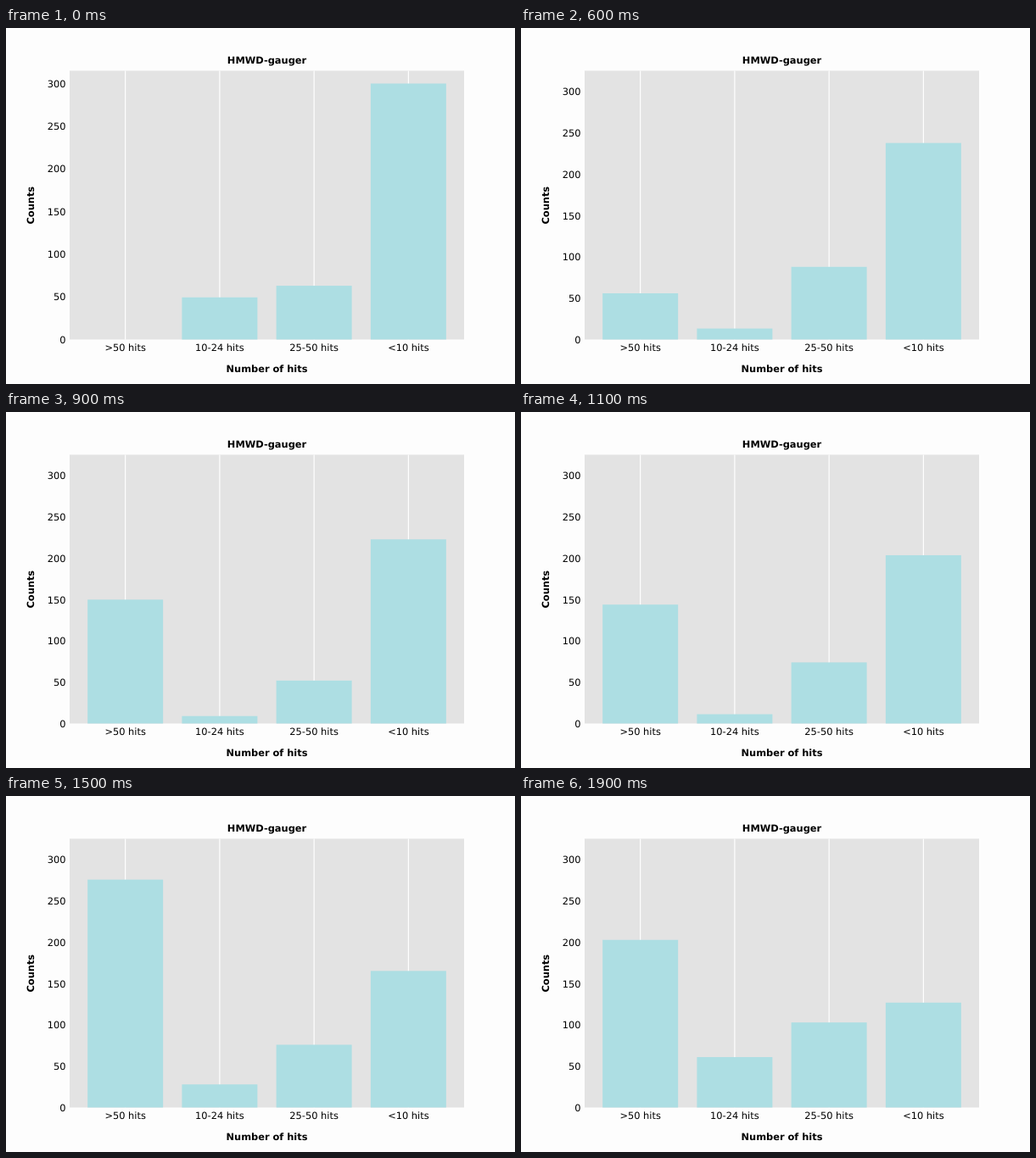
Write an HTML page that moves like this. It is 600 px wide and 420 px high and loops after 2 s.

```html
<!DOCTYPE html>
<html lang="en">
<head>
<meta charset="utf-8">
<title>Hit counts</title>
<style>
  html, body { margin: 0; width: 100%; height: 100%; overflow: hidden; background: #fdfdfd; }
  svg { display: block; width: 100%; height: 100%; }
  text { font: 11.4px "DejaVu Sans", sans-serif; fill: #000; text-anchor: middle; text-rendering: geometricPrecision; }
  .bold { font-weight: bold; }
  .tick { text-anchor: end; }
</style>
</head>
<body>
<svg id="chart" viewBox="0 0 600 420"></svg>
<script>
const LOOP = 2000, STEP = 100;
const LEFT = 75, RIGHT = 540, TOP = 50.4, BASE = 367.5;
const WIDTH = RIGHT - LEFT, HEIGHT = BASE - TOP;
const SLOT = WIDTH / 4.18, BAR = 0.8 * SLOT;

// Straight runs between [step, count] turning points.
const path = (...points) => step => {
  const i = Math.max(1, points.findIndex(p => p[0] >= step));
  const [s0, v0] = points[i - 1], [s1, v1] = points[i];
  return v0 + (v1 - v0) * (step - s0) / (s1 - s0);
};

const series = [
  { label: '>50 hits', count: path([0, 0], [6, 56], [9, 150], [13, 138], [15, 276], [19, 203]) },
  { label: '10-24 hits', count: step => 9 + 0.51 * (step - 8.9) ** 2 },
  { label: '25-50 hits', count: path([0, 63], [6, 88], [9, 52], [13, 96], [15, 76], [19, 103]) },
  { label: '<10 hits', count: path([0, 300], [3, 290], [6, 238], [9, 223], [19, 127]) }
];

const svg = document.getElementById('chart');

function add(name, attrs, text) {
  const el = document.createElementNS('http://www.w3.org/2000/svg', name);
  for (const key in attrs) el.setAttribute(key, attrs[key]);
  if (text !== undefined) el.textContent = text;
  svg.appendChild(el);
  return el;
}

add('rect', { x: LEFT, y: TOP, width: WIDTH, height: HEIGHT, fill: '#e3e3e3' });
series.forEach((s, i) => {
  const x = LEFT + (i + 0.59) * SLOT;
  add('line', { x1: x, x2: x, y1: TOP, y2: BASE, stroke: '#fff', 'stroke-width': 1.15 });
  s.bar = add('rect', { x: x - BAR / 2, width: BAR, fill: '#addee3' });
  add('text', { x, y: 381.2 }, s.label);
});

const ticks = [];
for (let value = 0; value <= 300; value += 50) {
  ticks.push({ value, el: add('text', { x: 70.4, class: 'tick' }, value) });
}

add('text', { x: 307.5, y: 42, class: 'bold' }, 'HMWD-gauger');
add('text', { x: 307.5, y: 405.7, class: 'bold' }, 'Number of hits');
add('text', { transform: 'translate(33 209.2) rotate(-90)', class: 'bold' }, 'Counts');

function draw(time) {
  const step = Math.floor((time % LOOP) / STEP);
  const peak = step ? 310 : 300;
  const scale = HEIGHT / (1.05 * peak);
  for (const { bar, count } of series) {
    const height = count(step) * scale;
    bar.setAttribute('y', BASE - height);
    bar.setAttribute('height', height);
  }
  for (const { value, el } of ticks) el.setAttribute('y', BASE - value * scale + 4.2);
}

const start = performance.now();
function loop() {
  draw(performance.now() - start);
  requestAnimationFrame(loop);
}
loop();
</script>
</body>
</html>
```
